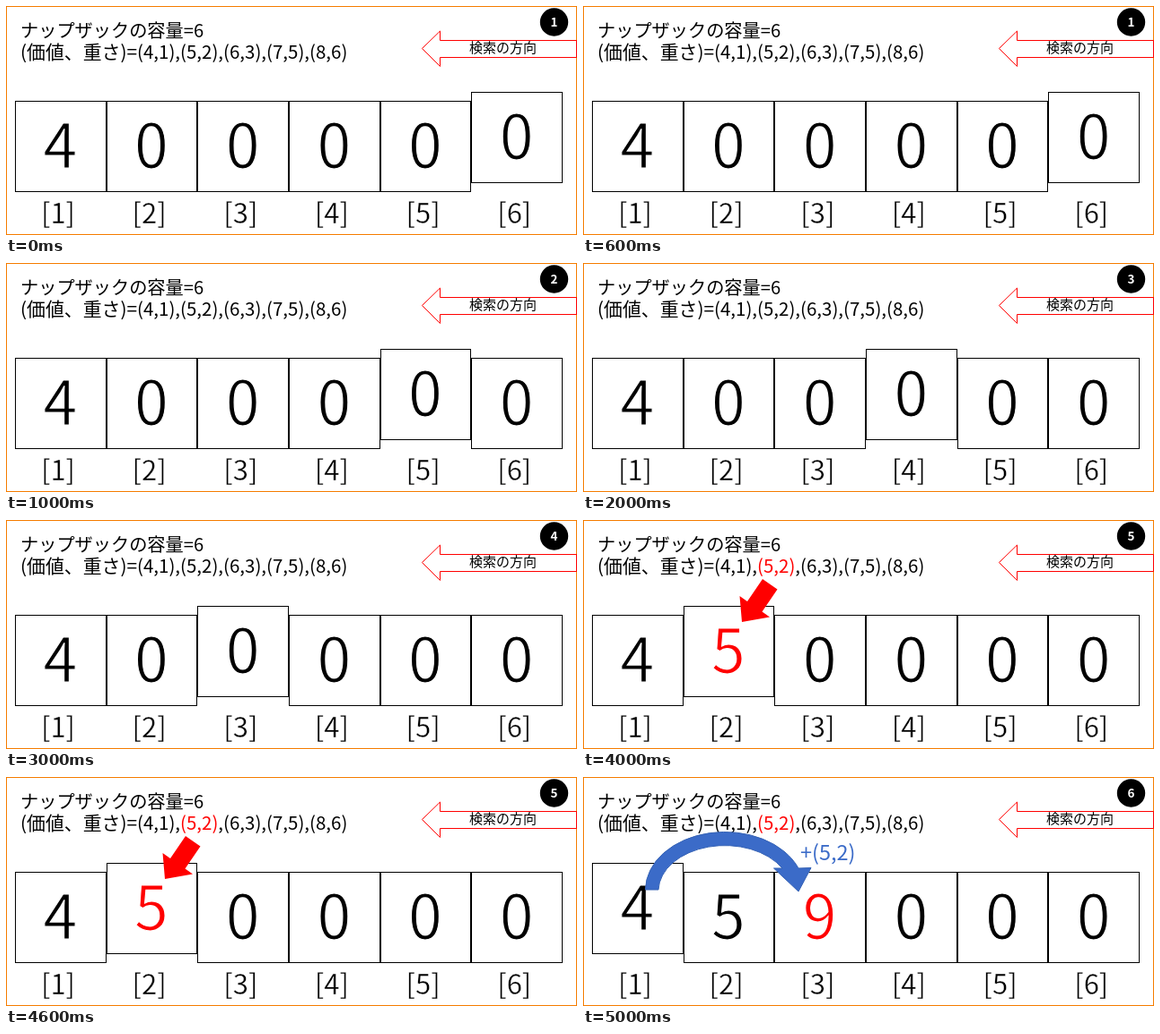
Recreate the animation shown at these times as an HTML page with a canvas. Size 636 px wide and 256 px high, loop 6000 ms.

```html
<!DOCTYPE html>
<html lang="ja">
<head>
<meta charset="utf-8">
<title>ナップザック問題</title>
<style>
  html, body { margin: 0; width: 100%; height: 100%; overflow: hidden; background: #fff; }
  canvas { display: block; width: 636px; height: 256px; }
</style>
</head>
<body>
<canvas width="636" height="256"></canvas>
<script>
const canvas = document.querySelector('canvas');
const ctx = canvas.getContext('2d');
const FAMILY = '"Noto Sans CJK JP", "Noto Sans CJK", sans-serif';
const RED = '#ff0000', BLUE = '#3b6bc8';
const STEP = 1000, PITCH = 101.65;
const ITEMS = ['(4,1)', '(5,2)', '(6,3)', '(7,5)', '(8,6)'];

// raised: lifted cell, fresh: cell just written, item: pair in use
const STEPS = [
  { cells: '400000', raised: 5 },
  { cells: '400000', raised: 4 },
  { cells: '400000', raised: 3 },
  { cells: '400000', raised: 2 },
  { cells: '450000', raised: 1, fresh: 1, item: 1, overlay: pickArrow },
  { cells: '459000', raised: 0, fresh: 2, item: 1, overlay: addArrow },
];

function text(str, x, y, size, color = '#000', align = 'left', weight = 400) {
  ctx.font = `${weight} ${size}px ${FAMILY}`;
  ctx.textAlign = align;
  ctx.fillStyle = color;
  ctx.fillText(str, x, y);
}

// Centred text with its strokes thinned by a white outline.
function lightText(str, x, y, size, color, trim) {
  text(str, x, y, size, color, 'center', 300);
  ctx.strokeStyle = '#fff';
  ctx.lineWidth = trim;
  ctx.strokeText(str, x, y);
  ctx.lineWidth = 1;
}

function shape(path, fill, stroke) {
  const p = new Path2D(path);
  if (fill) { ctx.fillStyle = fill; ctx.fill(p); }
  if (stroke) { ctx.strokeStyle = stroke; ctx.stroke(p); }
}

function pickArrow() {
  shape('M200 66L216.5 77.5L199.5 102.5L208 108.5L177 114L174.5 85L183 91Z', RED);
}

function addArrow() {
  shape('M69.5 126A88.5 65 0 0 1 240 102L254 101.5L240 128L212.5 102L222 102' +
    'A74 51 0 0 0 84 126Z', BLUE, '#3562b5');
  text('+(5,2)', 242, 93, 23.5, BLUE, 'left', 300);
}

function header(step, number) {
  text('ナップザックの容量=6', 16, 35, 20.2);
  text('(価値、重さ)=', 16, 59, 20.9);
  ITEMS.forEach((pair, i) => {
    const x = 146 + 48 * i;
    text(pair, x, 59, 20.5, i === step.item ? RED : '#000');
    if (i < ITEMS.length - 1) text(',', x + 42.3, 59, 20.5);
  });

  shape('M635.5 38.5H483.5V28L463.5 47.5L483.5 67.5V57.5H635.5Z', null, RED);
  text('検索の方向', 553.5, 52, 15, '#000', 'center');

  ctx.fillStyle = '#000';
  ctx.beginPath();
  ctx.arc(610.5, 18, 15.7, 0, Math.PI * 2);
  ctx.fill();
  text(number, 610.5, 23, 13.5, '#fff', 'center', 700);
}

function cell(step, i) {
  const left = Math.round(10 + PITCH * i);
  const right = Math.round(10 + PITCH * (i + 1));
  const mid = 60.3 + PITCH * i;
  const lift = i === step.raised ? 10 : 0;
  ctx.strokeStyle = '#000';
  ctx.strokeRect(left + .5, 106.5 - lift, right - left - 1, 101);
  lightText(step.cells[i], mid, 180.5 - lift, 68, i === step.fresh ? RED : '#000', 1.2);
  lightText(`[${i + 1}]`, mid - 2.3, 243, 31, '#000', .4);
}

function draw(index) {
  const step = STEPS[index];
  ctx.lineWidth = 1;
  ctx.fillStyle = '#fff';
  ctx.fillRect(0, 0, 636, 256);
  ctx.strokeStyle = '#f57c00';
  ctx.strokeRect(.5, .5, 635, 255);
  header(step, index + 1);
  for (let i = 0; i < 6; i++) cell(step, i);
  if (step.overlay) step.overlay();
}

const start = performance.now();
function tick() {
  const time = performance.now() - start;
  draw(Math.floor(time / STEP) % STEPS.length);
  requestAnimationFrame(tick);
}
tick();
</script>
</body>
</html>
```
